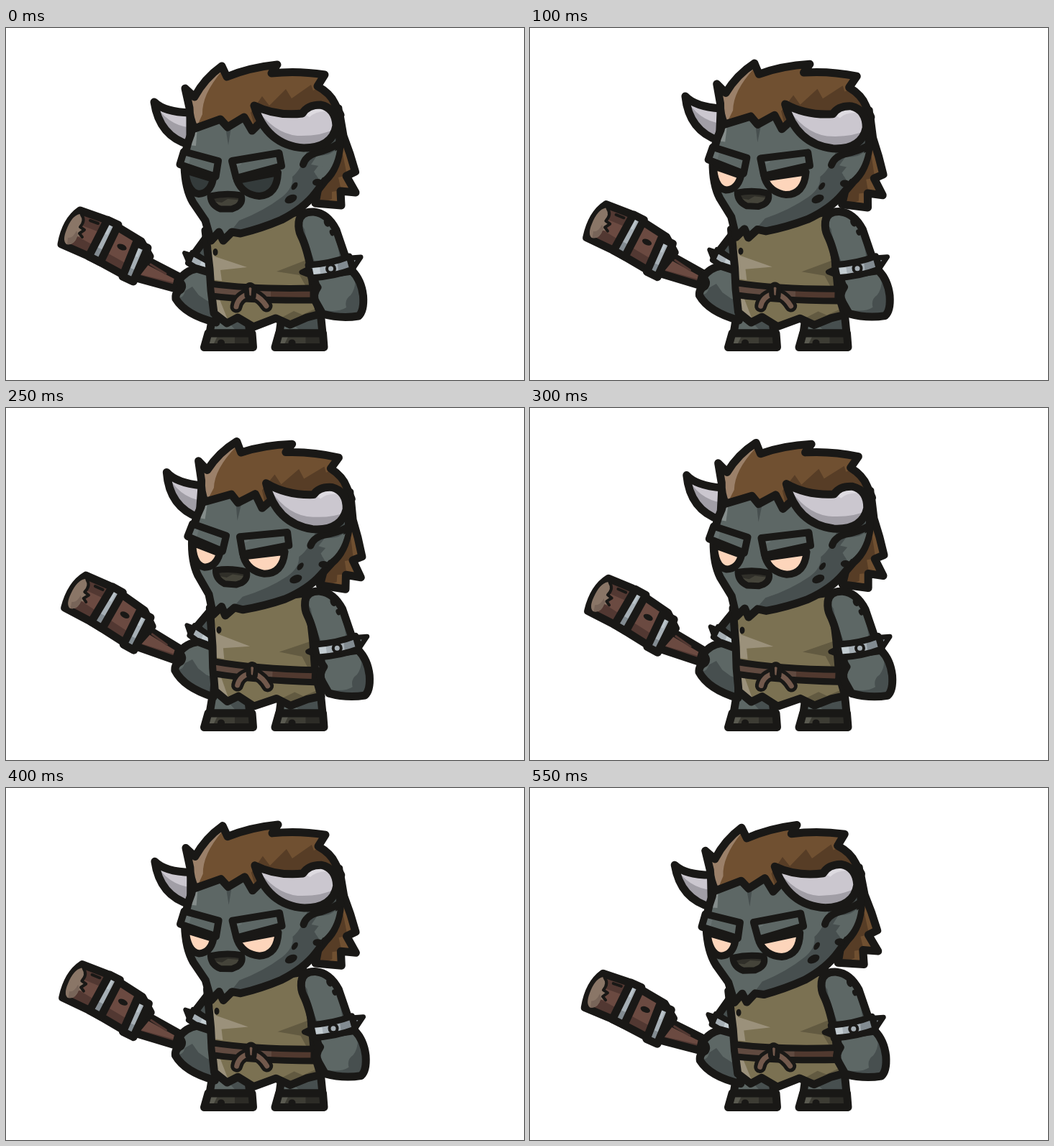
Recreate the animation shown at these times as an HTML page with a canvas. Size 720x490 px, loop 600 ms.

```html
<!DOCTYPE html>
<html lang="en">
<head>
<meta charset="utf-8">
<title>Idle minotaur</title>
<style>
html, body { margin: 0; width: 100%; height: 100%; overflow: hidden; background: #fff; }
canvas { display: block; }
</style>
</head>
<body>
<canvas id="stage" width="720" height="490"></canvas>
<script>
const ctx = document.getElementById('stage').getContext('2d');
const LOOP = 600, STEP = 50;
const INK = '#191816', SKIN = '#5d6765', SHADE = '#474f4f', GLOSS = '#858d8b',
      HAIR = '#705031', HAIR_DARK = '#573d26', HORN = '#cbc7cf', HORN_DARK = '#a19ea6',
      CLOTH = '#7b7152', CLOTH_DARK = '#625a41', CLOTH_LIGHT = '#9b917b',
      WOOD = '#6b4a41', WOOD_DARK = '#523832', STEEL = '#a6afb5', STEEL_DARK = '#828b91',
      BELT = '#604a40', HOOF = '#3d3c34', HOOF_DARK = '#2c2b26';

const fill = (d, color) => { ctx.fillStyle = color; ctx.fill(new Path2D(d)); };
const line = (d, width = 11, color = INK) => {
  ctx.strokeStyle = color;
  ctx.lineWidth = width;
  ctx.stroke(new Path2D(d));
};
// Filled shape, then [path, color] details clipped to it, then its outline.
function shape(d, color, details = [], width = 11) {
  fill(d, color);
  ctx.save();
  ctx.clip(new Path2D(d));
  for (const [path, tone] of details) fill(path, tone);
  ctx.restore();
  line(d, width);
}
function spot(x, y, rx, ry, angle = 0, color = INK) {
  ctx.beginPath();
  ctx.ellipse(x, y, rx, ry, angle, 0, 2 * Math.PI);
  ctx.fillStyle = color;
  ctx.fill();
}
function pose(draw, { x = 0, y = 0, px = 0, py = 0, deg = 0 }) {
  ctx.save();
  ctx.translate(px + x, py + y);
  ctx.rotate(deg * Math.PI / 180);
  ctx.translate(-px, -py);
  draw();
  ctx.restore();
}
// Linear swing: 0 at time low, 1 at time high, back to 0.
function swing(t, low, high) {
  const u = (t - low + LOOP) % LOOP, rise = (high - low + LOOP) % LOOP;
  return u < rise ? u / rise : (LOOP - u) / (LOOP - rise);
}

function legs() {
  shape('M288 395L283 425H339L336 400Z', SKIN, [['M296 395L322 424H345V395Z', SHADE]]);
  shape('M384 395L380 425H440L437 395Z', SKIN, [['M392 395L398 412L412 424H445V395Z', SHADE]]);
  for (const x of [0, 98.5]) {
    pose(() => {
      shape('M281 425H342L343.5 444.5H275.5Z', HOOF,
        [['M318 425H345V447H318Z', HOOF_DARK], ['M284 430L294 429L289 439L281 440Z', '#5a5a50']]);
      spot(299, 438, 5, 4.5);
    }, { x });
  }
}

function clubArm() {
  shape('M186 318L240 346L236 363L170 345Z', WOOD, [['M174 340L240 356V368L165 350Z', WOOD_DARK]]);
  shape('M103 254L137 266L188 297L200 318L176 349L160 342L118 319L77 301Q83 268 103 254Z', WOOD,
    [['M104 255L140 264L132 285L98 272Z', WOOD_DARK], ['M76 300L92 286L180 335V352Z', WOOD_DARK]]);
  fill('M102 259Q112 263 104 275L109 280L103 284L107 291L99 290Q95 303 84 301Q78 296 84 281Q91 262 102 259Z', '#8a7667');
  fill('M86 292Q93 293 98 282L100 288Q95 303 85 301Z', '#786559');
  line('M105 260Q111 268 103 277L109 281L102 286L106 291', 4);
  line('M117 268L128 272', 4);
  shape('M141 267L156 274L131 326L115 318Z', STEEL,
    [['M122 303L140 311L130 328L112 319Z', STEEL_DARK], ['M140 266L149 270L141 288L132 284Z', '#b9c3c9']]);
  shape('M181 299L197 306L177 353L162 346Z', STEEL,
    [['M168 332L185 339L178 356L160 346Z', STEEL_DARK], ['M181 299L190 303L183 319L174 316Z', '#b9c3c9']]);
  spot(161, 305, 7, 4, .4);
  line('M201 329L222 342', 3, WOOD_DARK);

  shape('M281 288L262 314L290 340Z', SHADE);
  shape('M258 316L248 313L254 327Z', STEEL, [], 6);
  shape('M259 313L290 330V350L253 327Z', STEEL, [['M274 318L294 330V352L268 335Z', '#c3ccd1']], 8);
  shape('M292 343L265 335Q249 338 240 352Q247 358 243 364Q235 368 236 377Q250 400 292 410Z', SKIN,
    [['M238 374Q246 378 249 366L259 360L268 372L280 380L292 384V412Q250 402 238 374Z', SHADE]]);
}

function torso() {
  shape('M277 282L283 335L285 365L289 397L307 411L322 403L344 416L375 404L395 413L418 403L437 398L428 370L422 320L412 255L330 270Z',
    CLOTH, [
      ['M286 372L297 378L309 408L289 398Z', CLOTH_LIGHT],
      ['M279 292L290 318L335 333L298 337L300 352L284 350Z', CLOTH_LIGHT],
      ['M425 320L376 339L408 344L416 358L430 360Z', CLOTH_DARK],
      ['M372 409L400 394L412 399L440 386V410L395 420Z', CLOTH_DARK]
    ]);
  spot(291, 312, 3.5, 5);
  shape('M284 356Q345 364 427 362V379Q345 380 286 373Z', BELT, [['M368 360H430V382H368Z', '#51392f']], 9);
  for (const tail of ['M335 371Q322 376 320 388', 'M344 371Q355 376 362 387']) {
    line(tail, 17);
    line(tail, 7, '#72594c');
  }
  shape('M334 361Q339 354 345 361L344 374Q339 379 335 373Z', '#72594c', [], 7);
}

function fistArm() {
  shape('M407 270Q409 255 428 256Q447 258 459 281L474 325L424 336Q418 305 410 289Q406 281 407 270Z', SKIN,
    [['M440 256Q462 290 464 323L480 320L463 275Z', SHADE], ['M409 272L424 335L432 332Q418 300 415 280Z', SHADE]]);
  spot(446, 271, 4, 6, -.4);
  spot(453, 285, 3, 4.5, -.4);
  shape('M430 345Q427 354 433 361Q425 372 431 382L440 398Q465 405 490 401Q498 394 496.5 373Q494 351 481 338Z', SKIN,
    [['M484 344Q498 360 499 404L440 403L437 392Q461 397 473 389Q470 378 479 372Q488 360 484 344Z', SHADE]]);
  shape('M423 334L411 340L424 345Z', STEEL, [], 7);
  shape('M479 320L493 319L483 334Z', STEEL_DARK, [], 7);
  shape('M420 330Q452 328 477 318L482 336Q456 346 424 348Z', STEEL,
    [['M460 322L485 312V342L463 346Z', STEEL_DARK], ['M426 326H435L438 349H428Z', '#c3ccd1']], 9);
  spot(451.5, 335, 7.5, 7.5);
  spot(451.5, 335, 3.5, 3.5, 0, STEEL);
}

function mane() {
  shape('M455 110L464 121L469 150L478 175L485.5 200L473 206L486 229L465 227L466 247L430 244L440 190Z', HAIR,
    [['M468 175L474 205L462 208L466 226L453 228L453 238L425 250L430 225L460 195Z', HAIR_DARK]]);
}

const eye = (d, open) => shape(d, open ? '#fdd5bb' : '#343b3b', [], 10);

function head(open) {
  shape('M206 103Q220 117 256 118V163Q213 151 206 103Z', HORN,
    [['M206 104Q224 136 258 139V170Q215 155 206 104Z', HORN_DARK]]);

  shape('M262 122L257 148Q248 170 248 192Q249 224 260 243L277 268L285 296L296 284L302 296L314 284L326 286Q355 279 383 267Q414 251 430 230L444 212Q462 195 464 162L462 112L350 105Z',
    SKIN, [
      ['M420 165Q412 196 398 207Q400 222 384 235Q358 255 324 268L310 286L326 295Q400 278 442 232L436 212L428 200L443 180L464 166V150Z', SHADE],
      ['M266 138L264 164L253 163L258 140Z', GLOSS],
      ['M305 138H313L309 163Z', SHADE]
    ]);
  fill('M432 178Q449 178 460 170Q456 195 441 208L430 204L440 193L424 190Z', SKIN);
  line('M413 190Q416 179 430 174Q448 170 464 160', 10);
  spot(433, 215, 7, 5);
  spot(401, 220, 3.5, 6, .6);
  spot(396, 238, 9, 5.5, -.45);

  eye('M249 198L288 210Q284 230 268 231Q252 229 249 198Z', open);
  eye('M321 212L378 201Q377 232 352 234Q329 232 321 212Z', open);
  shape('M247 172L295 185L291.5 207L241.5 190Z', SKIN, [['M247 172L258 174L253 194L240 190Z', '#687271']], 10);
  shape('M314 185L379.5 174L383 192L320 209Z', SKIN, [['M314 185L328 183L327 190L318 194Z', '#687271']], 10);
  shape('M284 234Q306 229 327 233Q330 243 321 249L314 252H298Q285 247 284 234Z', '#45443a',
    [['M280 228H332V240L308 238L300 243L284 241Z', '#302f29']], 9);

  shape('M249 84L262 96Q276 70 300 53L307 68Q338 55 377 51L369 63Q405 59 443 65L433 81Q451 91 457 105L465 121L440 115L352 133L342 143L331 124L308 138L298 127L262 140Q255 126 255 111Z',
    HAIR, [
      ['M340 118L356 95L366 108L389 85L397 98L424 79L427 87L440 81L470 124L345 135Z', HAIR_DARK],
      ['M253 98L265 138L273 120Q272 93 300 60L276 68Z', '#9b8069']
    ]);

  shape('M345 108Q375 123 412 119Q419 107 437 107Q458 111 459 136Q454 167 414 167Q362 163 345 108Z', HORN,
    [['M345 108Q372 147 405 150Q440 151 462 138V175H400Q360 165 345 108Z', HORN_DARK],
     ['M416 121Q424 110 437 111L444 116Q430 116 422 124Z', '#dedbe1']]);
}

function render(t) {
  ctx.fillStyle = '#fff';
  ctx.fillRect(0, 0, 720, 490);
  ctx.lineJoin = ctx.lineCap = 'round';
  const sway = swing(t, 550, 250) - 1 / 6;
  const nod = swing(t, 500, 213) - .32;
  legs();
  pose(clubArm, { px: 400, py: 355, deg: 4.9 * sway });
  pose(torso, { px: 365, py: 425, deg: 3 * sway });
  const tilt = { px: 398, py: 330, deg: 7.7 * nod };
  pose(mane, tilt);
  pose(fistArm, { x: 10.5 * sway, y: -sway });
  pose(() => head(t >= STEP), tilt);
}

function tick(now) {
  render(Math.floor(now % LOOP / STEP) * STEP);
  requestAnimationFrame(tick);
}
tick(performance.now());
</script>
</body>
</html>
```
